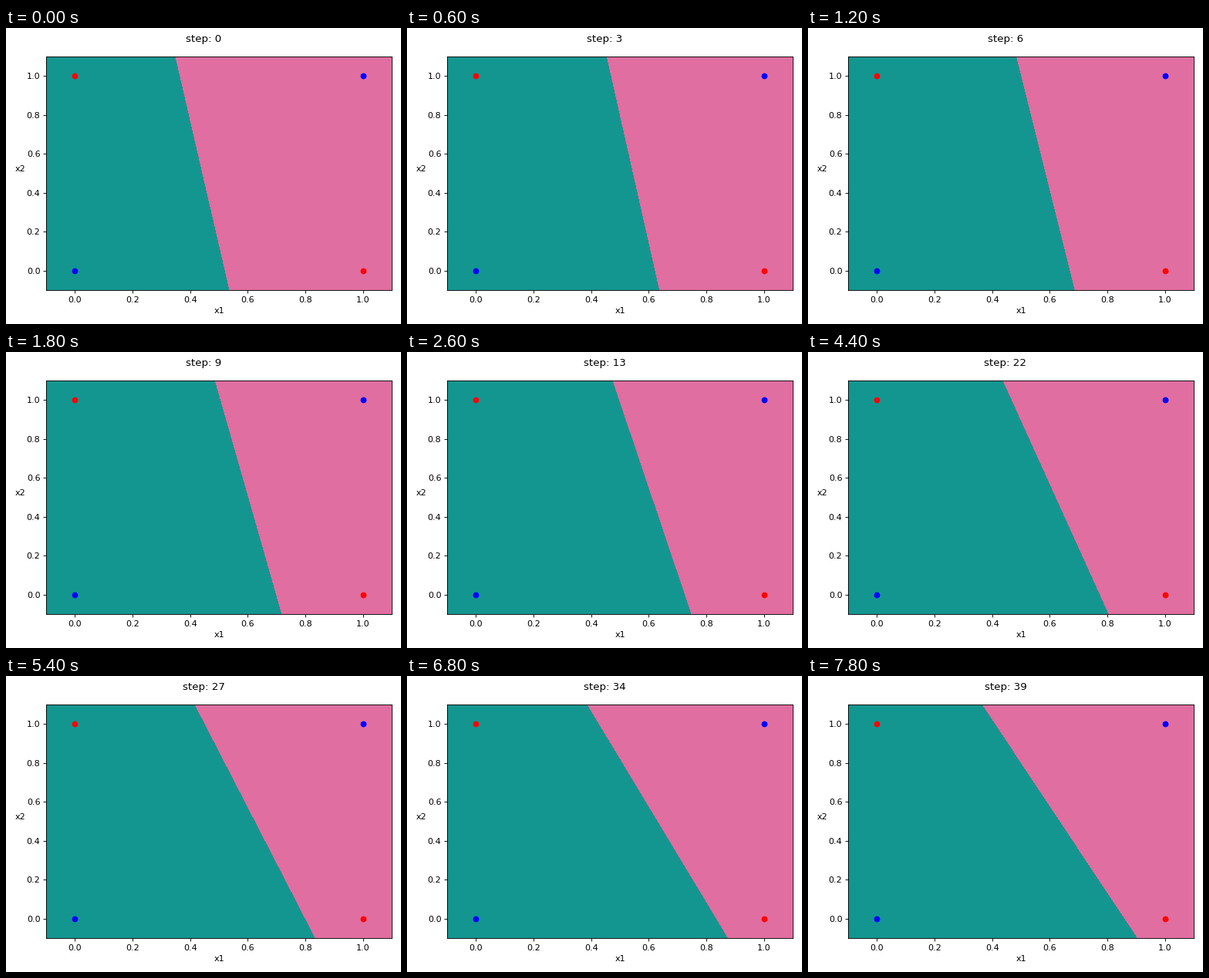
A matplotlib script for the animation above (8000 ms loop, 512 px wide and 384 px high).

```python
import numpy as np
import matplotlib.pyplot as plt
from matplotlib.animation import FuncAnimation

W, H, DPI = 512, 384, 80
LOW, HIGH = -0.1, 1.1
STEPS, INTERVAL = 40, 200
TEAL, PINK = "#149690", "#e06ea0"

plt.rcParams["font.family"] = "DejaVu Sans"
fig, ax = plt.subplots(figsize=(W / DPI, H / DPI), dpi=DPI, facecolor="white")
ax.set_facecolor(PINK)
ax.set_xlim(LOW, HIGH)
ax.set_ylim(LOW, HIGH)
ticks = np.linspace(0, 1, 6)
ax.set_xticks(ticks)
ax.set_yticks(ticks)
ax.set_xlabel("x1")
ax.set_ylabel("x2", rotation=0, labelpad=7)

region, = ax.fill([LOW] * 4, [LOW, LOW, HIGH, HIGH], color=TEAL, lw=0,
                  antialiased=False, zorder=1)
ax.plot([0, 1], [1, 0], "o", color="red", ms=6)
ax.plot([0, 1], [0, 1], "o", color="blue", ms=6)
title = fig.suptitle("step: 0", fontsize=12)
fig.tight_layout()


def boundary(n):
    """x1 of the decision line at the bottom and top of the axes."""
    middle = 0.601 + 0.0008 * n - 0.1607 * np.exp(-n / 3.04)
    spread = 0.1487 + 0.01 * n + (0.0388 - 0.0102 * n) * np.exp(-n / 4.5)
    return middle + spread / 2, middle - spread / 2


def update(n):
    bottom, top = boundary(n)
    region.set_xy([(LOW, LOW), (bottom, LOW), (top, HIGH), (LOW, HIGH)])
    title.set_text(f"step: {n}")
    return region, title


anim = FuncAnimation(fig, update, frames=STEPS, interval=INTERVAL,
                     repeat=True, repeat_delay=0, blit=False)
plt.show()
```
